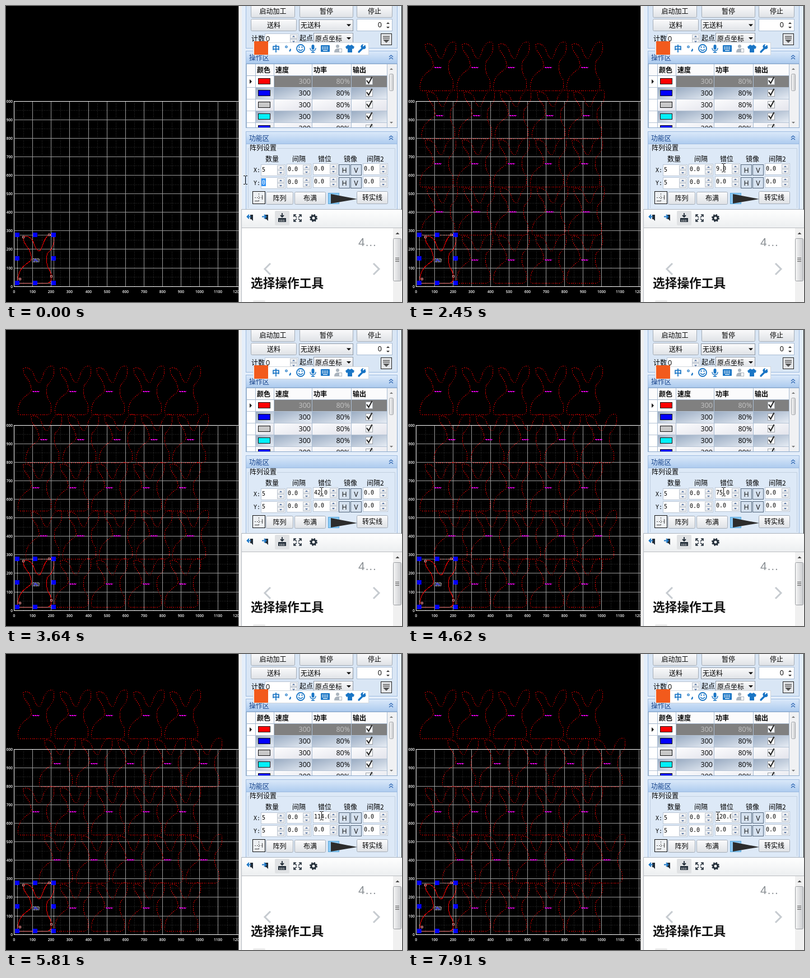
Recreate the animation shown at these times as an HTML page. Size 707 by 529 pixels, loop 8000 ms.

```html
<!DOCTYPE html>
<html lang="zh">
<head>
<meta charset="utf-8">
<title>Array offset</title>
<style>
html, body { margin: 0; width: 100%; height: 100%; overflow: hidden; background: #000; }
svg { display: block; width: 707px; height: 529px; }
text { font: 12px "Noto Sans CJK SC", "Noto Sans CJK", "Noto Sans CJK JP", sans-serif; white-space: pre; }
text.m { font: 10px "DejaVu Sans Mono", monospace; }
text.n { font: 12.5px "Open Sans", sans-serif; }
text.b { font-weight: bold; }
text.t { font: 600 6.6px "Open Sans", sans-serif; fill: #fff; }
.c { shape-rendering: crispEdges; }
</style>
</head>
<body>
<svg id="stage" viewBox="0 0 707 529" xmlns="http://www.w3.org/2000/svg"></svg>
<script>
const LOOP = 8000;
const stage = document.getElementById('stage');
const out = [];
const add = s => out.push(s);

const rect = (x, y, w, h, fill, stroke, more = '') =>
  add(`<rect x="${stroke ? x + .5 : x}" y="${stroke ? y + .5 : y}" width="${stroke ? w - 1 : w}" height="${stroke ? h - 1 : h}" fill="${fill}" ${stroke ? `stroke="${stroke}"` : ''} ${more}/>`);
const text = (x, y, s, cls = '', fill = '#000', more = '') =>
  add(`<text x="${x}" y="${y}" class="${cls}" fill="${fill}" ${more}>${s}</text>`);
const path = (d, stroke, w = 1, fill = 'none', more = '') =>
  add(`<path d="${d}" fill="${fill}" stroke="${stroke}" stroke-width="${w}" ${more}/>`);
const tri = (x, y, r, up, fill = '#333') =>
  path(`M${x - r} ${y}h${2 * r}l${-r} ${up ? -r : r}z`, 'none', 0, fill);
const mid = 'text-anchor="middle"';

function button(x, y, w, h, label, id = '') {
  rect(x, y, w, h, 'url(#btn)', '#a4adb8', `rx="2" ${id && `id="${id}"`}`);
  text(x + w / 2, y + h / 2 + 4.5, label, '', '#000', mid);
}
function combo(x, y, w, h, label) {
  rect(x, y, w, h, 'url(#btn)', '#8e98a5');
  text(x + 3, y + h / 2 + 4.5, label);
  tri(x + w - 8, y + h / 2 - 2, 4, false, '#000');
}
function spin(x, y, w, h, value, id = '') {
  rect(x, y, w, h, '#fff', '#bac6d5');
  const bx = x + w - 15;
  rect(bx, y + 2, 13, h / 2 - 2, 'url(#btn)', '#bcc5d0');
  rect(bx, y + h / 2, 13, h / 2 - 2, 'url(#btn)', '#bcc5d0');
  tri(bx + 6.5, y + h / 2 - 3.5, 2.5, true, '#49699b');
  tri(bx + 6.5, y + h / 2 + 3.5, 2.5, false, '#49699b');
  add(`<svg x="${x + 1}" y="${y}" width="${w - 17}" height="${h}"><text class="m" x="1" y="12.5" ${id && `id="${id}"`}>${value}</text></svg>`);
}
function header(y, label) {
  rect(428, y, 271, 23, 'url(#head)', '#9dbbe0');
  text(434, y + 16.5, label, '', '#15428b');
  for (const k of [8, 12]) path(`M684 ${y + k + 3}l3.5 -3l3.5 3`, '#2a63b0', 1.2);
}

const gradient = (id, a, b, dir = 'x2="0" y2="1"') =>
  `<linearGradient id="${id}" ${dir}><stop stop-color="${a}"/><stop offset="1" stop-color="${b}"/></linearGradient>`;
add('<defs>' +
  gradient('btn', '#fbfbfc', '#dfe2e6') +
  gradient('head', '#dbe9fa', '#adcbee') +
  gradient('cellA', '#98aac1', '#e6ecf4', 'x2="1" y2="1"') +
  gradient('cellB', '#fdfdfe', '#e3e4ec', 'x2="1" y2="1"') +
  gradient('tool', '#ffffff', '#eceef0') +
  gradient('bar', '#f6f6f6', '#c9cbce', 'x2="1"') +
  '<clipPath id="view"><path d="M0 0H415V529H0z"/></clipPath>' +
  '<clipPath id="grid"><path d="M428 104H699V217H428z"/></clipPath>' +
  '<path id="rabbit" fill="none" stroke="#f00" d="M11 4C16 0 24 4 28 11C32 20 33 28 40 29C46 22 46 10 54 2C58 -1 64 -2 65.500 2C67 18 60 28 54 33C51 42 52 50 55 58C60 66 61 70 61 74C61 82 60 86 52 86.500H6C0 86 0 82 2.500 72C6 58 14 54 24 46C27 40 24 34 22 28C18 20 10 14 11 4z"/>' +
  '<g id="copy" class="c"><use href="#rabbit" stroke-width=".9" stroke-dasharray="1.700 1.900"/>' +
  '<path d="M27 44.500H40M28 45.500H40" stroke="#f0f" stroke-dasharray="3 1"/></g></defs>');

// Drawing area
function canvas() {
  const U = 33.12, X = v => Math.floor(14.6 + v * U) + .5, Y = v => Math.floor(501.2 - v * U) + .5;
  rect(0, 0, 707, 529, '#000');
  add('<g clip-path="url(#view)"><g class="c">');
  for (let i = 0; i <= 12; i++) {
    path(`M${X(i + .5)} 170V501`, '#383838', 1, 'none', 'stroke-dasharray="1 2"');
    if (i < 10) path(`M14 ${Y(i + .5)}H415`, '#383838', 1, 'none', 'stroke-dasharray="1 2"');
  }
  for (let i = 0; i <= 12; i++) {
    path(`M${X(i)} 170V501`, i ? '#9a9a9a' : '#fff');
    if (i < 11) path(`M14 ${Y(i)}H415`, i % 10 ? '#9a9a9a' : '#fff');
  }
  add('</g>');
  for (let i = 0; i <= 12; i++) {
    text(X(i), 513, i * 100, 't', '#fff', mid);
    if (i < 11) text(12, Y(i) + 2, i * 100, 't', '#fff', 'text-anchor="end"');
  }
  add('<g id="array">');
  for (let r = 0; r < 5; r++) {
    add(`<g class="${r % 2 ? 'odd' : ''}">`);
    for (let c = 0; c < 5; c++) add(`<use href="#copy" x="${Math.round(20 + c * 65.5)}" y="${65 + r * 86}"/>`);
    add('</g>');
  }
  add('</g><use href="#rabbit" x="20" y="409" class="c"/>');
  rect(20, 409, 66, 87, 'none', '#fff', 'stroke-dasharray="1 1" class="c"');
  for (const [x, y] of [[31, 413], [77, 409], [81, 483], [25, 488]]) rect(x - 2, y - 2, 4, 4, '#000', '#f99');
  rect(46, 451, 14, 7, '#444', '#aaa', 'rx="1" stroke-dasharray="3 1"');
  path('M49 457l4 -4l4 4M50 452l6 4', '#44f', 1.2);
  for (const y of [409, 451, 495])
    for (const x of [20, 52, 85])
      if (y !== 451 || x !== 52) rect(x - 4, y - 4, 8, 8, '#00f');
  add('</g>');
}

function topPanel() {
  rect(415, 0, 292, 529, '#f0f0f0');
  rect(415, 0, 1, 529, '#b0b0b0');
  rect(421, 0, 286, 364, '#e4eefa');
  rect(428, -2, 271, 78, '#d9e6f5', '#9dbbe0');
  button(437, -2, 79, 23, '启动加工');
  button(524, -2, 96, 23, '暂停');
  button(626, -2, 64, 23, '停止');
  button(437, 23, 82, 22, '送料');
  combo(523, 24, 97, 21, '无送料');
  rect(626, 23, 64, 22, '#fff', '#a9bcd3');
  text(671, 38, '0', 'n', '#000', 'text-anchor="end"');
  tri(682, 32, 3, true);
  tri(682, 37, 3, false);
  text(438, 63, '计数');
  spin(462, 49, 60, 20, '');
  text(464, 63, '0', 'n');
  text(524, 62, '起点');
  combo(549, 48, 71, 20, '原点坐标');
  rect(669, 49, 20, 21, '#e4e6e9', '#222');
  path('M673 54.500h12M673 57.500h12', '#555', 1.3);
  tri(679, 60, 6, false, '#555');
}

function imeBar() {
  const B = '#1975c5';
  rect(441, 65, 207, 23, '#fff', '#d3d8de');
  rect(443, 63, 25, 24, '#f25a1c');
  text(475, 81, '中', 'b', B, 'style="font-size:14px"');
  add(`<circle cx="500.500" cy="73" r="1.700" fill="none" stroke="${B}" stroke-width="1.300"/>`);
  path('M507 77q2 1 -1 4', B, 2.4);
  add(`<circle cx="526" cy="76" r="7" fill="none" stroke="${B}" stroke-width="1.800"/>`);
  path('M523.500 72v3M528.500 72v3M522 77q4 5 8 0', B, 1.6);
  rect(545.500, 69, 5, 9, B, '', 'rx="2.500"');
  path('M543 75q0 5 5 5q5 0 5 -5M548 80v3M545 83h6', B, 1.4);
  rect(562, 70, 16, 12, B, '', 'rx="1"');
  path('M564 73.500h12M564 76.500h12', '#fff', 1.4, 'none', 'stroke-dasharray="2 1"');
  path('M566 79.500h8', '#fff', 1.3);
  add('<circle cx="592" cy="72" r="3" fill="#aab4be"/>');
  path('M586 83q0 -7 6 -7h3v7z', 'none', 0, '#aab4be');
  rect(594, 76, 6, 7, '#fff', '#aab4be');
  path('M611 69q3 3 6 0l5 4l-2 4l-2 -1v7h-8v-7l-2 1l-2 -4z', 'none', 0, B);
  path('M630 82l7 -7', B, 3.2, 'none', 'stroke-linecap="round"');
  path('M641 70l-3 3l-2 -2l2 -2q-5 0 -4 5q4 5 8 1z', B, 1, B);
}

function table() {
  rect(428, 103, 271, 115, '#fff', '#8ba9cc');
  add('<g clip-path="url(#grid)">');
  rect(429, 104, 251, 20, '#fbfbfc');
  const cols = [429, 445, 478, 546, 616, 680];
  ['颜色', '速度', '功率', '输出'].forEach((s, i) => text(cols[i + 1] + 3, 119, s, 'b'));
  ['#f00', '#00f', '#c8c8c8', '#00f0f8', '#00f'].forEach((color, r) => {
    const y = 124 + r * 21, ink = r ? '#000' : '#c4c4c4';
    const fill = r ? (r % 2 ? 'url(#cellA)' : 'url(#cellB)') : '#808080';
    for (let c = 1; c < 5; c++)
      rect(cols[c], y, cols[c + 1] - cols[c], 21, c === 1 && !r ? '#fff' : fill);
    rect(450, y + 5, 22, 11, color, '#111');
    text(544, y + 15, '300', 'n', ink, 'text-anchor="end"');
    text(614, y + 15, '80%', 'n', ink, 'text-anchor="end"');
    rect(642, y + 4, 13, 13, '#f8f9fa', '#a0a5ab');
    path(`M644 ${y + 9}l3.500 5l6 -11`, '#222', 2);
    path(`M429 ${y + .5}H680`, r ? '#b5c3d4' : '#9fb2c9');
  });
  for (const x of cols) path(`M${x + .5} 104V217`, '#a9bdd3');
  path('M435 131l4 4l-4 4z', 'none', 0, '#111');
  rect(681, 104, 17, 113, '#f0f1f3');
  rect(684, 121, 8, 31, 'url(#bar)', '#a6a9ad', 'rx="2"');
  tri(688, 114, 3, true, '#777');
  tri(688, 207, 3, false, '#777');
  add('</g>');
}

function arrayPanel() {
  rect(428, 246, 271, 118, '#dde9f7', '#9dbbe0');
  path('M432.500 361V254.500H434M484 254.500H694.500V361', '#c1cfdf');
  text(435, 258, '阵列设置');
  [[463, '数量'], [511, '间隔'], [557, '错位'], [603, '镜像'], [644, '间隔2']].forEach(([x, s]) => text(x, 278, s));
  for (let r = 0; r < 2; r++) {
    const y = 283 + r * 23;
    text(442, y + 14, 'XY'[r] + ':', 'm');
    spin(455, y, 44, 21, '5', r ? 'count' : '');
    spin(501, y - 1, 44, 21, '0.0');
    spin(548, y - 2, 45, 21, '0.0', r ? '' : 'offset');
    for (const [x, s] of [[594, 'H'], [615, 'V']]) {
      rect(x, y, 20, 20, '#d5e1ef', '#55687e');
      text(x + 10, y + 14.5, s, 'n', '#111', mid);
    }
    spin(637, y - 2, 45, 21, '0.0');
  }
  add('<g id="picked"><rect x="456" y="308" width="8" height="14" fill="#3393f4"/><text class="m" x="457" y="318.500" fill="#fff">0</text></g>');
  rect(440, 331, 23, 23, '#edf0f3', '#111');
  path('M451.500 335v15M444 342.500h15', '#555', 1, 'none', 'stroke-dasharray="2 2" class="c"');
  path('M444 348.500h7M457.500 338v8', '#444', 1, 'none', 'class="c"');
  button(464, 332, 49, 23, '阵列', 'apply');
  rect(466, 334, 45, 19, 'none', '#444', 'id="focus" stroke-dasharray="1 1" class="c"');
  button(515, 332, 56, 23, '布满');
  rect(575, 334, 20, 20, '#8cc8f2', '#5aa9dd');
  button(626, 331, 56, 23, '转实线');
  path('M580 336v17l47 -8z', 'none', 0, '#2c2c2c');
}

function lowerWindow() {
  const K = '#222d38';
  rect(421, 363, 286, 166, '#fff');
  rect(421, 363, 286, 34, 'url(#tool)');
  rect(421, 363, 286, 1, '#aab2bb');
  rect(421, 396, 286, 1, '#b9bcc0');
  rect(420, 363, 1, 166, '#b5bbc2');
  rect(480, 366, 26, 26, '#e0e2e4', '', 'rx="2"');
  path('M436 373h5v11l-3 -3h-2z', 'none', 0, K);
  path('M437 376.500h-6M434 373l-3.500 3.500l3.500 3.500', '#1975c5', 1.8);
  path('M463 373h5v11l-3 -3h-2z', 'none', 0, K);
  path('M457 376.500h7M461 373l3.500 3.500l-3.500 3.500', '#1975c5', 1.8);
  path('M486 379h14v7h-14z', 'none', 0, K);
  path('M488 382.500h10M488 384.500h10', '#eee', 1, 'none', 'stroke-dasharray="2 1"');
  path('M493 370v6M490 374l3 3l3 -3', K, 1.8);
  path('M514 377v-4h4M523 373h4v4M527 381v4h-4M518 385h-4v-4M515 374l4 4M526 374l-4 4M526 384l-4 -4M515 384l4 -4', K, 1.6);
  add(`<circle cx="549" cy="379" r="4" fill="none" stroke="${K}" stroke-width="3"/>`);
  add(`<circle cx="549" cy="379" r="6" fill="none" stroke="${K}" stroke-width="2" stroke-dasharray="2.400 2.312"/>`);
  text(629, 429, '4…', '', '#8a8f94', 'style="font:21px Arial,\'Liberation Sans\',sans-serif"');
  path('M472 460l-10 10l10 10', '#c6cbd0', 3);
  path('M656 460l10 10l-10 10', '#c6cbd0', 3);
  text(437, 503, '选择操作工具', 'b', '#111', 'style="font-size:21.700px"');
  rect(441, 526, 22, 3, '#ececec', '', 'rx="2"');
  rect(691, 397, 15, 132, '#f0f0f0');
  rect(691, 415, 15, 77, 'url(#bar)', '#9a9da1', 'rx="2"');
  path('M695 450.500h7M695 453.500h7M695 456.500h7', '#555');
  tri(699, 408, 3.5, true, '#444');
  rect(706, 0, 1, 364, '#222');
}

canvas(); topPanel(); header(80, '操作区'); table(); header(224, '功能区');
arrayPanel(); lowerWindow(); imeBar();
add('<g id="arrow"><path d="M.5 .5v15l3.500 -3l2.500 6l2.500 -1l-2.500 -6h5z" fill="#fff" stroke="#111"/></g>');
add('<path id="beam" class="c" d="M-3 -7.500H0M1 -7.500H4M.5 -7V7M-3 7.500H0M1 7.500H4" stroke="#111" fill="none"/>');
stage.innerHTML = out.join('');

const $ = id => document.getElementById(id);
const odd = stage.querySelectorAll('.odd');
const show = (el, on) => el.setAttribute('visibility', on ? 'visible' : 'hidden');

// Time, then value(s)
const offsets = [[2170, 0], [2380, 9], [2590, 9], [3430, 39], [3640, 43], [4060, 63], [4130, 63],
  [4620, 75.5], [4970, 90], [5810, 114], [6160, 114], [6370, 120]];
const mouse = [[140, 427, 311], [560, 488, 339], [910, 488, 339], [980, 545, 320], [1050, 597, 294],
  [1300, 609, 290], [1750, 571, 288], [1890, 563, 289], [6510, 563, 289], [6720, 574, 289],
  [7000, 574, 289], [7350, 566, 299], [7700, 556, 291], [7840, 553, 290]];

function at(keys, t) {
  let i = 0;
  while (i < keys.length && keys[i][0] <= t) i++;
  const b = keys[Math.min(i, keys.length - 1)], a = keys[Math.max(i - 1, 0)];
  const k = a === b ? 0 : (t - a[0]) / (b[0] - a[0]);
  return a.slice(1).map((v, j) => v + (b[j + 1] - v) * k);
}

function draw(now) {
  const t = Math.floor((now % LOOP) / 70) * 70;
  const offset = Math.floor(at(offsets, t)[0] / 3 + 1e-6) * 3;
  $('offset').textContent = offset.toFixed(1);
  odd.forEach(g => g.setAttribute('transform', `translate(${Math.round(offset * .3312)} 0)`));

  const typed = t >= 140;
  show($('array'), typed);
  show($('picked'), !typed);
  $('count').textContent = typed ? '5' : '';

  const active = t >= 490 && t < 1890, pressed = t >= 700 && t < 840;
  $('apply').setAttribute('fill', pressed ? '#b5d6ee' : active ? '#dfe8f6' : 'url(#btn)');
  $('apply').setAttribute('stroke', active ? '#8fa6cc' : '#a4adb8');
  show($('focus'), t >= 700 && t < 1890);

  const [x, y] = at(mouse, t).map(Math.round);
  const beam = t < 350 || (t > 1050 && x < 578);
  show($('beam'), beam);
  show($('arrow'), !beam);
  $(beam ? 'beam' : 'arrow').setAttribute('transform', `translate(${x} ${y})`);
}

const start = performance.now();
function tick() {
  draw(performance.now() - start);
  requestAnimationFrame(tick);
}
tick();
</script>
</body>
</html>
```
